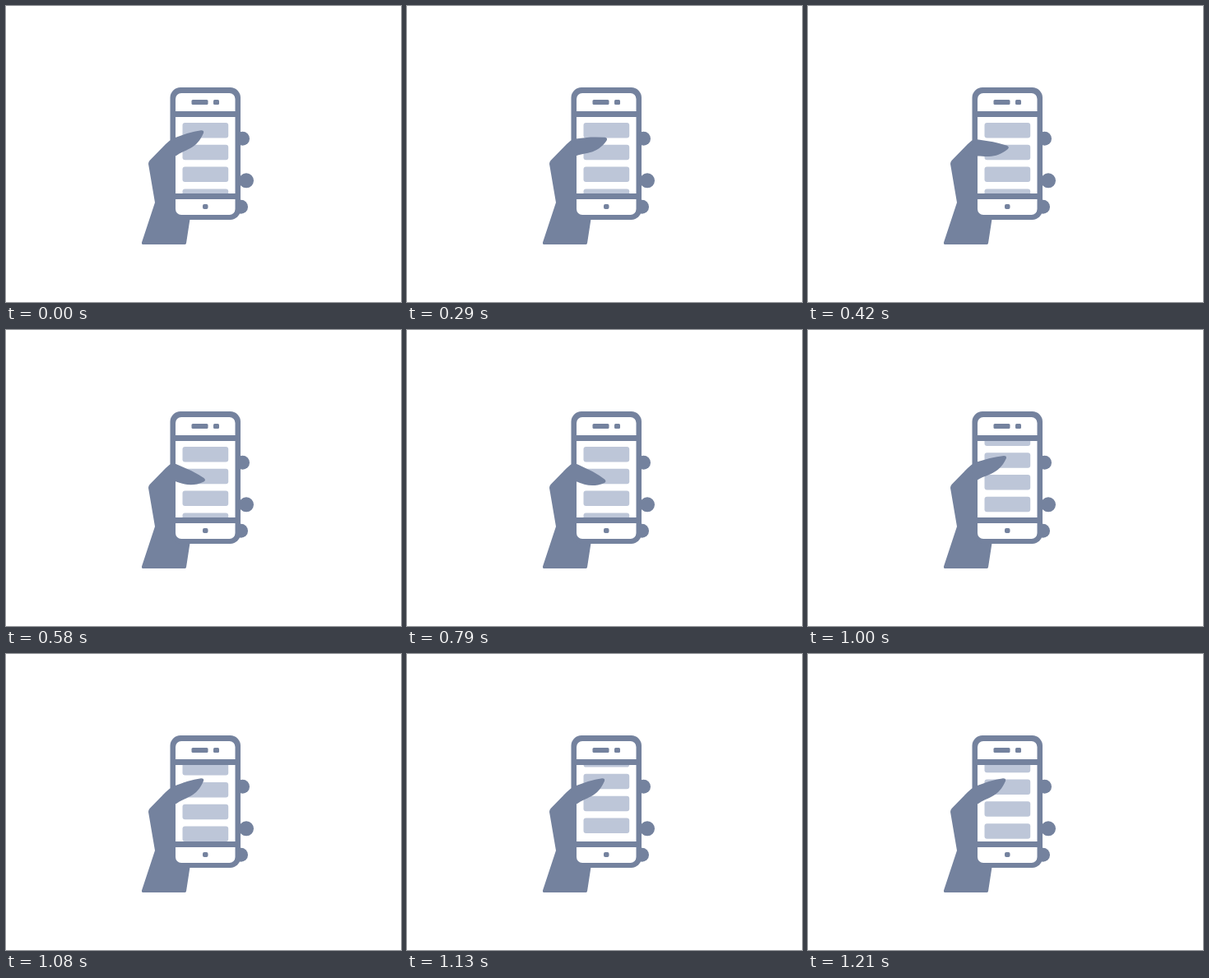
An HTML page for the animation above (1.25 s loop, 480 by 360 pixels).

```html
<!DOCTYPE html>
<html lang="en">
<head>
<meta charset="utf-8">
<title>Scrolling on a phone</title>
<style>
  html, body { margin: 0; width: 100%; height: 100%; overflow: hidden; background: #fff; }
  svg { display: block; width: 100vw; height: 100vh; }
</style>
</head>
<body>
<svg viewBox="0 0 480 360" fill="#74829e">
  <clipPath id="screen"><rect x="206" y="135" width="72" height="93"/></clipPath>

  <!-- fingers and hand behind the phone -->
  <circle cx="287.5" cy="161.3" r="8.5"/>
  <circle cx="292" cy="212.3" r="9"/>
  <circle cx="285.5" cy="244.3" r="8.5"/>
  <path d="M166 290Q164.500 289.500 165 287.500L181 239L173 192Q173 190 174.500 188L194 168Q199 163 204 161L224 256L219 288.500Q218.700 290 217 290Z"/>

  <!-- phone -->
  <rect x="199.500" y="99" width="85.500" height="161" rx="12.500"/>
  <rect x="206" y="106" width="72.500" height="148" rx="7" fill="#fff"/>
  <g clip-path="url(#screen)"><g id="bars" fill="#bdc6d8"></g></g>
  <path d="M204 128h76v7h-76zM204 228h76v7h-76z"/>
  <rect x="225.500" y="114" width="20" height="6" rx="1.500"/>
  <rect x="252" y="114" width="7" height="6" rx="1.500"/>
  <rect x="239" y="241" width="6.500" height="6" rx="2"/>

  <path id="thumb" d="M-2 -8L1 -9L18 -15Q27 -17.500 35 -18.800Q39 -19 38 -15.500C34 -6 29 -1 22 3C15 7 10 8 5 12L-2 14Z"/>
</svg>
<script>
const LOOP = 1250, FRAMES = 30, PITCH = 26.8, BARS = 5;
const bars = document.getElementById('bars');
const thumb = document.getElementById('thumb');

for (let i = 0; i < BARS; i++) {
  const bar = document.createElementNS('http://www.w3.org/2000/svg', 'rect');
  const box = { x: 214.5, y: 142 + (i - 1) * PITCH, width: 55.7, height: 18.5, rx: 3 };
  for (const key in box) bar.setAttribute(key, box[key]);
  bars.append(bar);
}

// Sine ease from 0 to 1 between two steps
function ease(step, from, to) {
  const u = Math.min(1, Math.max(0, (step - from) / (to - from)));
  return (1 - Math.cos(Math.PI * u)) / 2;
}

function draw(now) {
  // The motion advances in 24 steps per second
  const step = Math.floor((now % LOOP) / LOOP * FRAMES + 0.1) % FRAMES;
  const angle = 45 * (ease(step, 1.8, 16) - ease(step, 20.5, 24.7));
  const scroll = Math.max(0, step - 22.05) * 10.05 % PITCH;
  thumb.setAttribute('transform', `translate(202 170) rotate(${angle})`);
  bars.setAttribute('transform', `translate(0 ${-scroll})`);
  requestAnimationFrame(draw);
}
draw(performance.now());
</script>
</body>
</html>
```
